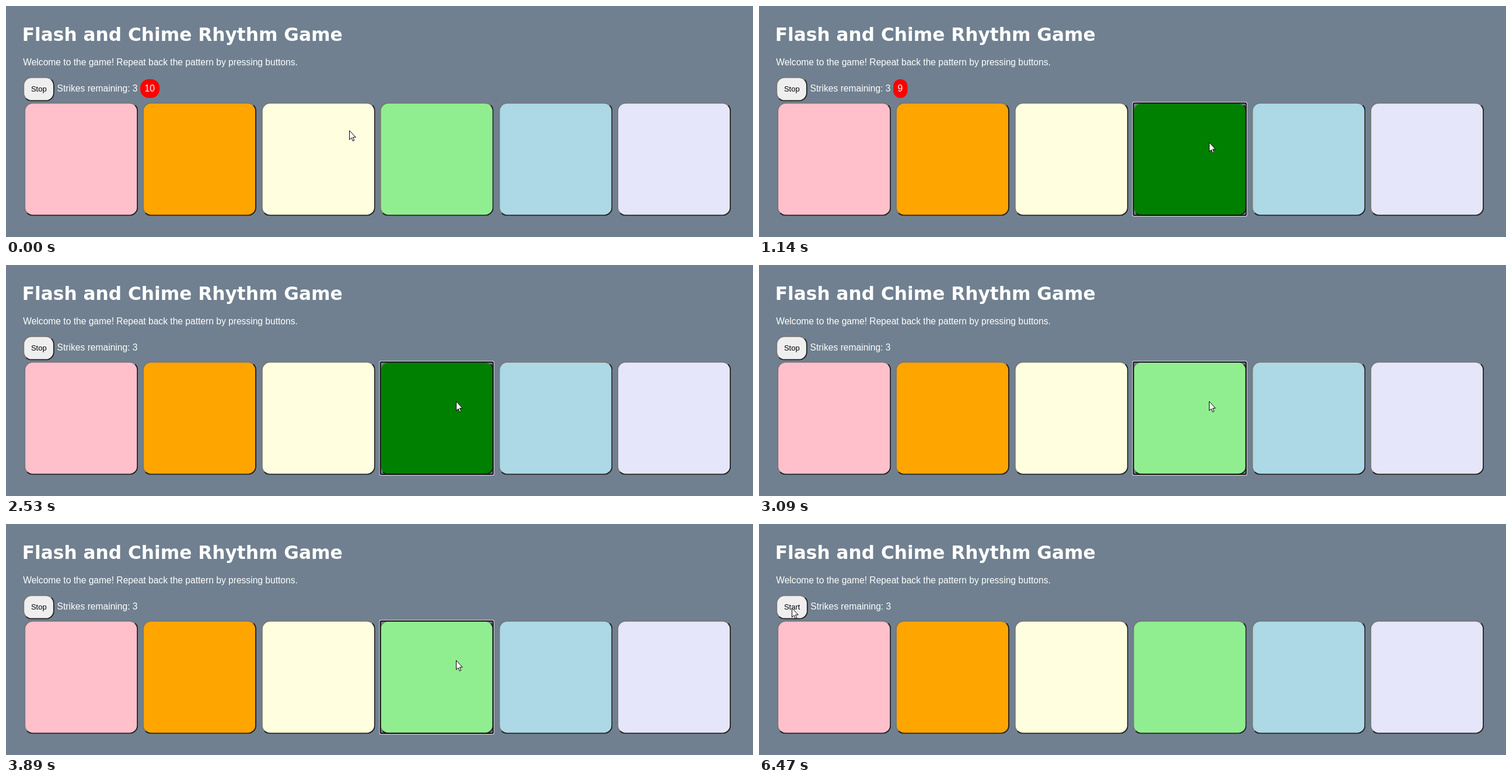
Animation, 1280 px wide and 397 px high, one loop 8 s. Source, as an HTML page:

```html
<!DOCTYPE html>
<html lang="en">
<head>
<meta charset="utf-8">
<title>Memory game</title>
<style>
  html, body { margin: 0; width: 100%; height: 100%; overflow: hidden; background: #708090; }
  #page {
    position: absolute; left: 0; top: 0; width: 1313px; height: 407px;
    transform: scale(.975); transform-origin: 0 0;
    font: 16px/18px "Liberation Sans", Arial, sans-serif; color: #fff; white-space: nowrap;
  }
  h1, p, #pads { position: absolute; left: 30px; margin: 0; }
  h1 { left: 28.5px; top: 32px; font: bold 32px/39px "DejaVu Sans", Verdana, sans-serif; }
  .intro { top: 91px; }
  .status { top: 125px; }
  #pads { left: 32px; top: 170px; display: flex; gap: 8.45px; }
  .button {
    position: relative; display: inline-block; box-sizing: border-box;
    border: 2px solid; border-color: #767676 #222 #222 #767676; border-radius: 15px;
  }
  #pads .button { flex: none; width: 200px; height: 200px; }
  #toggle { padding: 12px; background: #efefef; color: #000; font-size: 13.333px; line-height: 15px; }
  .focus::after {
    content: ""; position: absolute; inset: -2px;
    border: 2px solid #101010; border-radius: 2px; box-shadow: 0 0 0 1px #fff;
  }
  #timer { padding: 8px; border-radius: 15px; background: red; }
  #cursor { position: absolute; left: 0; top: 0; overflow: visible; }
</style>
</head>
<body>
<div id="page">
  <h1>Flash and Chime Rhythm Game</h1>
  <p class="intro">Welcome to the game! Repeat back the pattern by pressing buttons.</p>
  <p class="status"><span id="toggle" class="button">Stop</span> Strikes remaining: 3 <span id="timer">10</span></p>
  <div id="pads"></div>
</div>
<svg id="cursor" width="12" height="20">
  <path id="arrow" d="M.5 .5V16.2L4 13 6.3 18.6 8.7 17.6 6.4 12.1H11.2Z" fill="#fff" stroke="#000"/>
  <path id="beam" d="M0 .5H3L3.5 1 4 .5H7M3.5 1V15M0 15.5H3L3.5 15 4 15.5H7" fill="none" stroke="#000"/>
</svg>
<script>
const LOOP = 8000;
const el = id => document.getElementById(id);
const [toggle, timer, pads, cursor, arrow, beam] =
  ["toggle", "timer", "pads", "cursor", "arrow", "beam"].map(el);

const colors = ["pink", "orange", "lightyellow", "lightgreen", "lightblue", "lavender"];
for (const color of colors) {
  const pad = document.createElement("div");
  pad.className = "button";
  pad.style.background = color;
  pads.append(pad);
}
const green = pads.children[3];

// Each event changes part of the state and holds until the next one.
const events = [
  [0, { at: [588, 213.5], text: false, count: 10, lit: false, focus: null, label: "Stop" }],
  [120, { at: [760, 233] }],
  [270, { at: [771, 234] }],
  [890, { count: 9 }],
  [1140, { lit: true, focus: green }],
  [1570, { lit: false, count: "" }],
  [2530, { lit: true }],
  [3090, { lit: false }],
  [3360, { lit: true }],
  [3890, { lit: false }],
  [4290, { count: 10 }],
  [4850, { at: [541, 217] }],
  [5000, { at: [375, 186] }],
  [5125, { at: [195, 154] }],
  [5250, { at: [103, 137], text: true, count: 9 }],
  [5400, { at: [72, 137], text: false }],
  [5520, { at: [66.5, 134.5] }],
  [5800, { at: [60, 140] }],
  [5920, { at: [56, 144] }],
  [6200, { count: 8 }],
  [6350, { focus: toggle }],
  [6470, { focus: null, count: "", label: "Start" }]
];

function draw(now) {
  const t = now % LOOP;
  const state = Object.assign({}, ...events.filter(e => e[0] <= t).map(e => e[1]));
  toggle.textContent = state.label;
  timer.textContent = state.count;
  timer.style.visibility = state.count ? "visible" : "hidden";
  green.style.background = state.lit ? "green" : "lightgreen";
  for (const button of [green, toggle]) button.classList.toggle("focus", state.focus === button);
  cursor.style.transform = `translate(${state.at[0]}px, ${state.at[1]}px)`;
  arrow.style.display = state.text ? "none" : "";
  beam.style.display = state.text ? "" : "none";
}

const start = performance.now();
function tick() {
  draw(performance.now() - start);
  requestAnimationFrame(tick);
}
tick();
</script>
</body>
</html>
```
